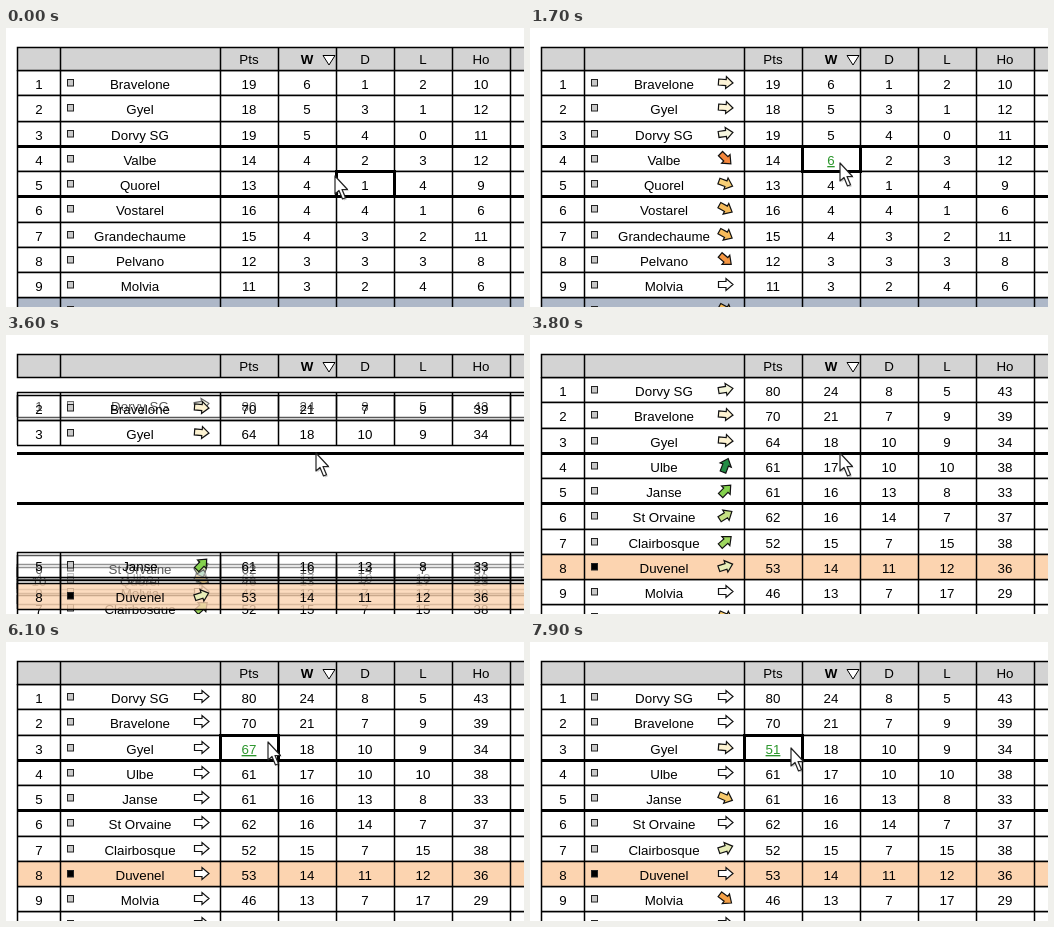
Animation, 518 px wide and 279 px high, one loop 8000 ms. Source, as an HTML page:

```html
<!DOCTYPE html>
<html lang="en">
<head>
<meta charset="utf-8">
<title>League table</title>
<style>
  html, body { margin: 0; width: 100%; height: 100%; overflow: hidden; background: #fff; }
  svg { display: block; width: 518px; height: 279px; }
  text { font: 13.33px "Liberation Sans", Arial, sans-serif; text-anchor: middle; fill: #000; }
  .bold { font-weight: bold; }
  .edited { fill: #2c962c; text-decoration: underline; }
  .line { fill: none; stroke: #000; stroke-width: 1.5; }
</style>
</head>
<body>
<svg id="stage" viewBox="0 0 518 279"></svg>
<script>
const LOOP = 8000, TOP = 42, PITCH = 25.25, COL = 58;
const SEASON_END = 3300, DEGREES_PER_RANK = 4.6;
const LABELS = ['Pts', 'W', 'D', 'L', 'Ho'];
const cellLeft = i => 214 + COL * i;
const cellMid = i => cellLeft(i) + 29;
const EDGES = [11, 54, ...[0, 1, 2, 3, 4, 5].map(cellLeft)];

// name, rank before and after, [W, D, Ho] before and after, rank shift in the last drag; later rows lie on top
const TEAMS = [
  ['', 10, 17],
  ['Valbe', 4, 15, [4, 2, 12]],
  ['Vostarel', 6, 13, [4, 4, 6]],
  ['Grandechaume', 7, 14, [4, 3, 11]],
  ['Pelvano', 8, 18, [3, 3, 8]],
  ['Dorvy SG', 3, 1, [5, 4, 11], [24, 8, 43]],
  ['Bravelone', 1, 2, [6, 1, 10], [21, 7, 39]],
  ['Gyel', 2, 3, [5, 3, 12], [18, 10, 34], 1],
  ['Ulbe', 19, 4, , [17, 10, 38]],
  ['Quorel', 5, 10, [4, 1, 9], [13, 7, 23]],
  ['Molvia', 9, 9, [3, 2, 6], [13, 7, 29], 8],
  ['St Orvaine', 13, 6, , [16, 14, 37]],
  ['Clairbosque', 16, 7, , [15, 7, 38], -4],
  ['Janse', 15, 5, , [16, 13, 33], 5],
  ['Duvenel', 12, 8, , [14, 11, 36]]
];

// start, end, x, y
const MOVES = [[0, 100, 323, 148], [200, 600, 310, 135], [2600, 3000, 310, 118],
  [4200, 4900, 262, 129], [5200, 5600, 262, 100], [7300, 7900, 261, 106]];

const stage = document.getElementById('stage');
const set = (node, attrs) => { for (const key in attrs) node.setAttribute(key, attrs[key]); };

function el(tag, attrs, parent = stage, text = '') {
  const node = document.createElementNS('http://www.w3.org/2000/svg', tag);
  set(node, attrs);
  node.textContent = text;
  return parent.appendChild(node);
}

const ramp = (t, from, to) => Math.min(1, Math.max(0, (t - from) / (to - from)));
const rowTop = rank => Math.round(TOP + PITCH * (rank - 1));

// Points and losses follow from wins, draws and games played
function record(values, games) {
  if (!values) return LABELS.map(() => '');
  const [w, d, ho] = values;
  return [3 * w + d, w, d, games - w - d, ho];
}

const wins = t => 4 + Math.round(6 * ramp(t, 900, 2500) ** 1.6);
const points = t => 64 + Math.round(3 * ramp(t, 5800, 6100) - 16 * ramp(t, 6100, 7900));

function trend(row, t) {
  const rise = 1 - (1 - ramp(t, 900, 2500)) ** 3;
  const season = (row.to - row.from) * rise * (1 - ramp(t, 4200, 4900));
  return DEGREES_PER_RANK * (season + row.dip * ramp(t, 6100, 7900));
}

// White when level, greener when rising, redder when falling
function tint(angle) {
  const a = Math.abs(angle);
  return angle < 0
    ? `hsl(${60 + a * a / 60} 60% ${100 - .95 * a}%)`
    : `hsl(${46 - a * a / 90} 90% ${55 + 45 * Math.exp(-a / 20)}%)`;
}

function makeRow([name, from, to, before, after, dip = 0]) {
  const g = el('g', {});
  const own = name === 'Duvenel';
  const bg = el('rect', { x: 11, width: 510 }, g);
  const grid = el('path', { class: 'line' }, g);
  const rank = el('text', { x: 33, y: 19 }, g);
  el('rect', { x: 61.5, y: 9.5, width: 6, height: 6.5, stroke: '#222', fill: own ? '#000' : '#c8c8c8' }, g);
  el('text', { x: 134, y: 19 }, g, name);
  const cells = LABELS.map((_, i) => el('text', { x: cellMid(i), y: 19 }, g));
  const arrow = el('path', { d: 'M-7-3H.5V-6L7.5 0L.5 6V3H-7Z', stroke: '#111', 'stroke-width': 1.2 }, g);
  return { name, from, to, dip, own, before: record(before, 9), after: record(after, 37),
    g, bg, grid, rank, cells, arrow };
}

const rows = TEAMS.map(makeRow);
for (const rank of [4, 6]) el('rect', { x: 11, y: rowTop(rank) - 1, width: 507, height: 3 });

el('path', { class: 'line', style: 'fill: #d3d3d3',
  d: 'M11.5 19.5H520V42.5H11.5Z' + EDGES.map(x => `M${x}.5 19V43`).join('') });
LABELS.forEach((label, i) =>
  el('text', { x: cellMid(i), y: 36, class: label === 'W' ? 'bold' : '' }, stage, label));
el('path', { d: 'M317 27.5H329L323 37Z', fill: '#fff', stroke: '#000' });

const frame = el('rect', { width: COL, fill: 'none', stroke: '#000', 'stroke-width': 3 });
const cursor = el('g', {});
const pointer = 'M0 0V18L4 14.5L7.5 23L10.5 21.7L7 13.5H12.5Z';
el('path', { d: pointer, opacity: .2, transform: 'translate(1.5 1.5)' }, cursor);
el('path', { d: pointer, fill: '#fff', stroke: '#222', 'stroke-width': 1.2, 'stroke-linejoin': 'round' }, cursor);

function drawRow(row, t, slide) {
  const late = t >= SEASON_END, moving = slide > 0 && slide < 1;
  const place = row.from + (row.to - row.from) * slide;
  const y = rowTop(place), h = rowTop(place + 1) - y;
  set(row.g, { transform: `translate(0 ${y})` });
  set(row.bg, {
    height: h,
    fill: row.own ? '#fcd4b0' : row.name || late ? '#fff' : '#aeb8c8',
    'fill-opacity': !moving ? 1 : row.own ? .8 : .35
  });
  set(row.grid, { d: `M11 .5H518M11 ${h}.5H518` + EDGES.map(x => `M${x}.5 0V${h}`).join('') });
  row.rank.textContent = late ? row.to : row.from;

  const values = [...(late ? row.after : row.before)];
  let edited = -1;
  if (row.name === 'Valbe' && t >= 1000 && !late) values[edited = 1] = wins(t);
  if (row.name === 'Gyel' && t >= 5800) values[edited = 0] = points(t);
  row.cells.forEach((cell, i) => {
    cell.textContent = values[i];
    set(cell, { class: i === edited ? 'edited' : '' });
  });

  const angle = trend(row, t);
  set(row.arrow, {
    visibility: t < 1000 ? 'hidden' : 'visible',
    transform: `translate(195.5 12.5) rotate(${angle})`,
    fill: tint(angle)
  });
}

function drawPointer(t) {
  let x = 329, y = 148;
  for (const [start, end, toX, toY] of MOVES) {
    const p = ramp(t, start, end);
    x += (toX - x) * p;
    y += (toY - y) * p;
  }
  set(cursor, { transform: `translate(${Math.round(x)} ${Math.round(y)})` });

  // Frame the cell just under the tip, except while the season plays out
  const left = cellLeft(Math.floor((x + 2 - cellLeft(0)) / COL));
  const rank = Math.floor((y + 2 - TOP) / PITCH) + 1, top = rowTop(rank);
  set(frame, {
    x: left + .5, y: top + .5, height: rowTop(rank + 1) - top,
    visibility: t >= 2900 && t < 4300 ? 'hidden' : 'visible'
  });
}

function draw(now) {
  const t = Math.floor(now % LOOP / 100) * 100;
  const slide = Math.sin(ramp(t, 3400, 3800) * Math.PI / 2);
  rows.forEach(row => drawRow(row, t, slide));
  drawPointer(t);
  requestAnimationFrame(draw);
}
requestAnimationFrame(draw);
</script>
</body>
</html>
```
